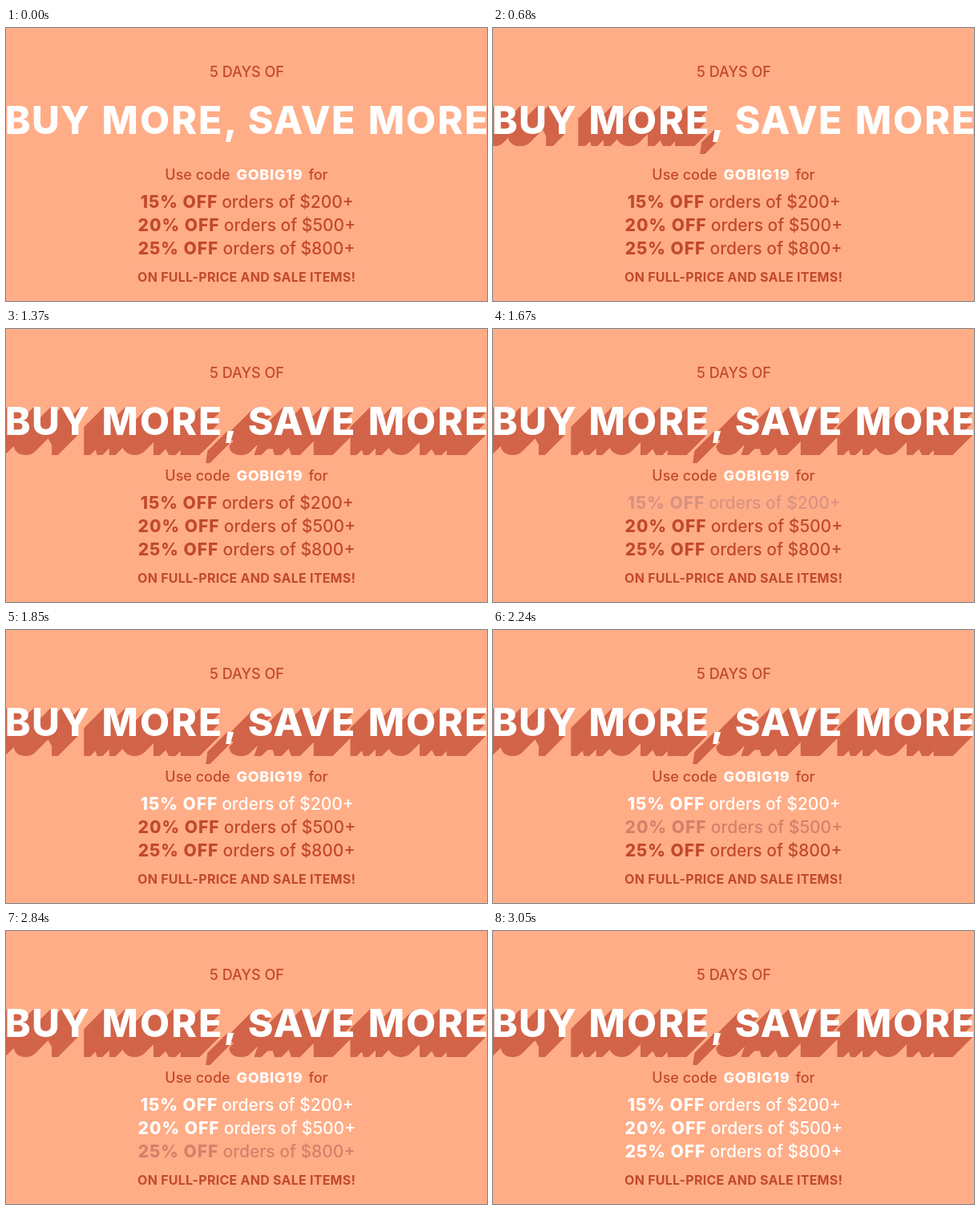
An HTML page for the animation above (4.2 s loop, 600 px wide and 340 px high).

```html
<!DOCTYPE html>
<html lang="en">
<head>
<meta charset="utf-8">
<style>
  html, body { margin: 0; width: 100%; height: 100%; overflow: hidden; background: #ffad87; }
  svg { display: block; width: 600px; height: 340px; font-family: Inter, "Liberation Sans", sans-serif; }
</style>
</head>
<body>
<svg id="stage" viewBox="0 0 600 340"></svg>
<script>
const LOOP = 4200, TICK = 30, DEPTH = 25, LAYERS = 50;
const RUST = [194, 73, 43], WHITE = [255, 255, 255], SHADE = '#d26449';
const stage = document.getElementById('stage');
const rgb = c => `rgb(${c.map(Math.round)})`;
const mix = (a, b, p) => a.map((v, i) => v + (b[i] - v) * p);

function add(parent, tag, attrs = {}, text = '') {
  const el = document.createElementNS('http://www.w3.org/2000/svg', tag);
  for (const key in attrs) el.setAttribute(key, attrs[key]);
  el.textContent = text;
  return parent.appendChild(el);
}

// x is the middle of the visible text; trailing letter spacing is offset
function label(parent, text, x, y, size, weight, spacing = 0, fill) {
  const attrs = { x: x + spacing / 2, y, 'font-size': size, 'font-weight': weight,
    'letter-spacing': spacing, 'text-anchor': 'middle' };
  if (fill) attrs.fill = fill;
  return add(parent, 'text', attrs, text);
}

const headline = [
  { start: 500, words: [['BUY', 51.5, 1.2], ['MORE,', 204, 2.1]] },
  { start: 1070, words: [['SAVE', 368.5, 1.3], ['MORE', 526.5, 2.1]] }
];
const drawWords = (parent, words) =>
  words.forEach(([text, x, spacing]) => label(parent, text, x, 131.5, 48, 800, spacing));

const shadows = headline.map(({ start, words }) => {
  const group = add(stage, 'g', { fill: SHADE });
  const layers = Array.from({ length: LAYERS }, () => {
    const layer = add(group, 'g');
    drawWords(layer, words);
    return layer;
  });
  return { start, group, layers };
});
const face = add(stage, 'g', { fill: '#fff' });
headline.forEach(({ words }) => drawWords(face, words));

const copy = add(stage, 'g', { fill: rgb(RUST) });
label(copy, '5 DAYS OF', 300.5, 61, 18, 500);
label(copy, 'Use code', 239, 188.5, 18, 500);
label(copy, 'GOBIG19', 328.5, 188.5, 18, 800, 0.7, '#fff');
label(copy, 'for', 389.5, 188.5, 18, 500);
label(copy, 'ON FULL-PRICE AND SALE ITEMS!', 300, 315.5, 16, 700, 0.25);

const offers = [
  ['15% OFF', 215.5, '$200+', 351.5, 1580],
  ['20% OFF', 215, '$500+', 354, 2180],
  ['25% OFF', 214.5, '$800+', 353, 2780]
].map(([deal, dealX, amount, orderX, start], i) => {
  const group = add(stage, 'g'), y = 224 + 29 * i;
  label(group, deal, dealX, y, 21, 800, 1);
  label(group, 'orders of ' + amount, orderX, y, 21, 450);
  return { group, start };
});

// Linear change in fixed ticks; the first tick already moves
const progress = (t, start, steps) =>
  Math.min(1, Math.max(0, (Math.floor((t - start) / TICK) + 1) / steps));

function render(t) {
  for (const { start, group, layers } of shadows) {
    const depth = DEPTH * progress(t, start, 11);
    group.setAttribute('visibility', depth ? 'visible' : 'hidden');
    layers.forEach((layer, i) => {
      const d = depth * (i + 1) / LAYERS;
      layer.setAttribute('transform', `translate(${-d} ${d})`);
    });
  }
  for (const { group, start } of offers)
    group.setAttribute('fill', rgb(mix(RUST, WHITE, progress(t, start, 10))));
}

const origin = performance.now();
function frame() {
  render((performance.now() - origin) % LOOP);
  requestAnimationFrame(frame);
}
render(0);
requestAnimationFrame(frame);
</script>
</body>
</html>
```
